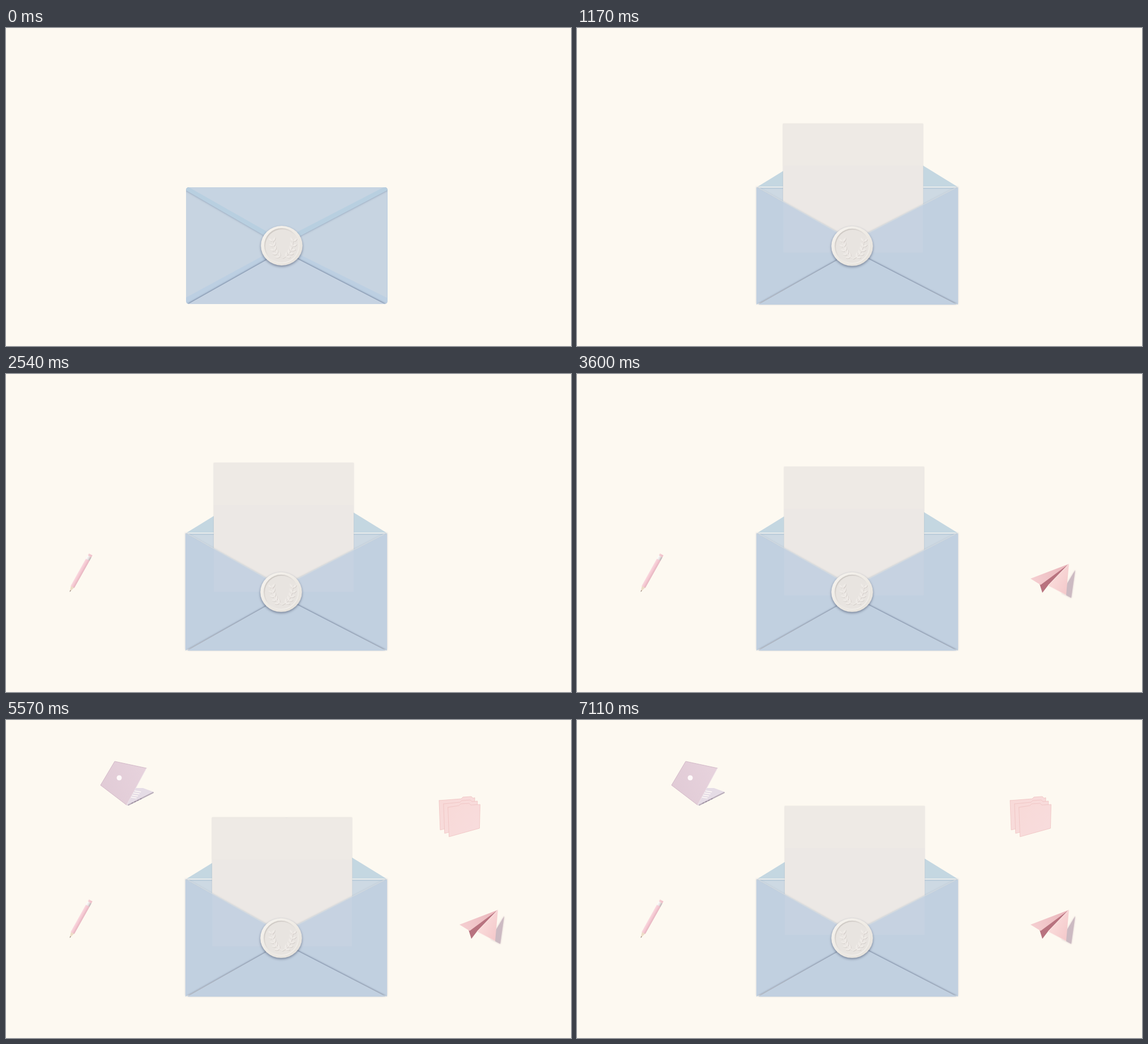
An HTML page with a canvas for the animation above (7.15 s loop, 998 by 561 pixels).

```html
<!DOCTYPE html>
<html lang="en">
<head>
<meta charset="utf-8">
<title>Letter</title>
<style>
html, body { margin: 0; width: 100%; height: 100%; overflow: hidden; background: #fdf9f1; }
canvas { display: block; }
</style>
</head>
<body>
<canvas id="stage" width="998" height="561"></canvas>
<script>
const W = 998, H = 561, LOOP = 7150, TAU = Math.PI * 2;
const ctx = document.getElementById('stage').getContext('2d');
const layerCanvas = document.createElement('canvas');
layerCanvas.width = W;
layerCanvas.height = H;
const layer = layerCanvas.getContext('2d');

const clamp = v => Math.max(0, Math.min(1, v));
const part = (t, start, length) => clamp((t - start) / length);
const smooth = k => k * k * (3 - 2 * k);
const easeOut = k => 1 - (1 - k) ** 3;
const mix = (a, b, k) => a + (b - a) * k;

function trace(g, pts) {
  g.beginPath();
  for (const [x, y] of pts) g.lineTo(x, y);
}
function poly(g, fill, ...pts) {
  trace(g, pts);
  g.closePath();
  g.fillStyle = fill;
  g.fill();
}
function line(g, color, width, ...pts) {
  trace(g, pts);
  g.strokeStyle = color;
  g.lineWidth = width;
  g.lineCap = 'round';
  g.stroke();
}
function disc(g, x, y, r, fill) {
  g.beginPath();
  g.arc(x, y, r, 0, TAU);
  g.fillStyle = fill;
  g.fill();
}
function blend(g, [x0, y0], [x1, y1], ...colors) {
  const f = g.createLinearGradient(x0, y0, x1, y1);
  colors.forEach((c, i) => f.addColorStop(i / (colors.length - 1), c));
  return f;
}
function withShadow(g, color, blur, dy, paint) {
  g.save();
  g.shadowColor = color;
  g.shadowBlur = blur;
  g.shadowOffsetY = dy;
  paint();
  g.restore();
}

// ---- wax seal, drawn around 0,0 ----
function leaf(g, x, y, angle, size) {
  g.save();
  g.translate(x, y);
  g.rotate(angle);
  g.beginPath();
  g.moveTo(0, 0);
  g.quadraticCurveTo(size / 2, -size * .4, size, 0);
  g.quadraticCurveTo(size / 2, size * .4, 0, 0);
  g.fill();
  g.restore();
}
function wreath(g, shift, color) {
  g.strokeStyle = g.fillStyle = color;
  for (const side of [-1, 1]) {
    g.save();
    g.translate(2 + shift, 20 + shift);
    g.scale(side, 1);
    g.beginPath();
    g.moveTo(0, 2);
    g.quadraticCurveTo(18, -6, 18, -32);
    g.stroke();
    for (let k = .15; k < 1; k += .19) {
      const q = 1 - k, x = 36 * k * q + 18 * k * k, y = 2 * q * q - 12 * k * q - 32 * k * k;
      for (const turn of [.7, -.8]) leaf(g, x, y, turn - .4 - k, 9);
    }
    g.restore();
  }
}
function seal(g, x, y) {
  g.save();
  g.translate(x, y);
  withShadow(g, 'rgba(80,90,115,.65)', 4, 2, () => {
    g.beginPath();
    g.ellipse(0, 0, 36.8, 35, 0, 0, TAU);
    g.fillStyle = blend(g, [-26, -30], [26, 30], '#f5f2ed', '#eeeae4', '#e6e2dc');
    g.fill();
  });
  disc(g, 0, 0, 31, blend(g, [-20, -24], [20, 24], '#cfcac5', '#e6e2de', '#f7f4f0'));
  disc(g, .5, .5, 29.3, '#e8e4e0');
  wreath(g, .8, '#d2ccc8');
  wreath(g, 0, '#efebe7');
  g.restore();
}

// ---- envelope ----
const LEFT = 317, RIGHT = 673, TOP = 281, BOTTOM = 488, MID = 487;
const sides = [LEFT, RIGHT];
const FRONT = '#c1d0e0', CREASE = 'rgba(85,100,130,.75)';

function bottomFlap(g, fill) {
  withShadow(g, CREASE, 3, -1, () =>
    poly(g, fill, [LEFT + 3, BOTTOM], [MID + 1, 393.5], [RIGHT - 2, BOTTOM]));
}

function closedEnvelope(g) {
  g.save();
  g.beginPath();
  g.roundRect(LEFT + 1, TOP, RIGHT - LEFT, BOTTOM - TOP - 1, 5);
  g.clip();
  g.fillStyle = '#bccfe2';
  g.fillRect(LEFT, TOP, RIGHT - LEFT + 2, BOTTOM - TOP);
  for (const x of sides) poly(g, '#c7d4e1', [x, TOP], [MID, 384], [x, BOTTOM - 12]);
  bottomFlap(g, '#c6d3e2');
  withShadow(g, 'rgba(110,130,160,.5)', 3, 1, () =>
    poly(g, '#b8cfe0', [LEFT, TOP - 5], [LEFT, TOP + 5], [MID, 384], [RIGHT + 1, TOP + 5], [RIGHT + 1, TOP - 5]));
  poly(g, '#c6d4e2', [LEFT + 6, TOP], [MID, 374], [RIGHT - 6, TOP]);
  g.restore();
  seal(g, MID, 384);
}

function backPanel(g) {
  poly(g, '#c4d7e1', [LEFT + 2, TOP - 1], [494, 172.5], [497, 172.5], [RIGHT - 1, TOP - 1]);
  poly(g, '#cdd9e3', [LEFT + 1, TOP], [RIGHT - 1, TOP], [MID, 390]);
  line(g, '#b9cbd9', 1.5, [LEFT + 4, TOP + 2], [RIGHT - 3, TOP + 2]);
}

function frontPanel(g) {
  withShadow(g, 'rgba(130,145,170,.5)', 3, -1, () => {
    for (const x of sides) poly(g, FRONT, [x, TOP], [MID, 376], [MID, 394], [x, BOTTOM]);
  });
  line(g, '#d0d9e1', 1.5, [LEFT + 4, TOP + 1], [MID, 376], [RIGHT - 4, TOP + 1]);
  bottomFlap(g, FRONT);
}

// ---- letter sheet ----
const SHEET_W = 247, SHEET_H = 227, FOLD = 74;
const sheetX = t => 365.3 + 1.8 * Math.cos(TAU * (t - 2700) / 4400);
function sheetY(t) {
  const rise = easeOut(part(t, 740, 1160));
  const sag = part(t, 1900, 4370) ** .65;
  const lift = smooth(part(t, 6270, 840));
  return mix(228, 150, rise) + 25 * sag - 23 * lift;
}

function openEnvelope(g, t) {
  const x = sheetX(t), y = sheetY(t), show = smooth(part(t, 740, 360));
  backPanel(g);
  g.globalAlpha = show;
  withShadow(g, 'rgba(140,140,150,.3)', 2, 0, () => {
    g.fillStyle = '#edeae5';
    g.fillRect(x, y, SHEET_W, SHEET_H);
  });
  g.fillStyle = '#ebe8e4';
  g.fillRect(x, y + FOLD, SHEET_W, SHEET_H - FOLD);
  g.globalAlpha = 1;
  frontPanel(g);
  // the sheet shows faintly through the front
  g.fillStyle = `rgba(236,232,228,${.09 * show})`;
  g.fillRect(x, y, SHEET_W, SHEET_H);
  seal(g, MID - 1, 384.8);
}

// ---- desk things ----
function pencil(g) {
  const band = (x, w, half, ...colors) => {
    g.fillStyle = blend(g, [0, -half], [0, half], ...colors);
    g.fillRect(x, -half, w, half * 2);
  };
  g.translate(112.5, 384.5);
  g.rotate(Math.atan2(-66, 37));
  poly(g, '#ecdcc6', [0, 0], [11, -3.4], [11, 3.4]);
  poly(g, '#8f7d7c', [0, 0], [3, -1], [3, 1]);
  band(10, 56, 3.7, '#f9d8de', '#f5c8d2', '#e5b4bf');
  band(65, 7, 3.7, '#ffffff', '#e9e2e2', '#b9adb0');
  band(72, 4, 3.5, '#f7d3d8', '#eebcc6');
}

function plane(g) {
  const nose = [869, 335], wing = [801, 361], keel = [822, 386], fold = [832, 373], tail = [864, 390];
  withShadow(g, 'rgba(190,165,175,.7)', 3, 0, () =>
    poly(g, '#ccbac2', [880, 346], [856, 386], [873, 395]));
  poly(g, '#b8737f', nose, [817, 370], keel, fold);
  poly(g, blend(g, wing, nose, '#f5cfd1', '#e9b4ba'), nose, wing, [819, 372]);
  poly(g, blend(g, fold, tail, '#fadbda', '#f3c8ca'), nose, fold, tail);
  line(g, '#fbe6e3', 1, nose, fold, tail);
}

function laptop(g) {
  const hinge = [213, 150], back = [248, 85], corner = [167, 115], end = [261, 127];
  poly(g, '#e5dce6', hinge, [229, 120], [242, 120], end, [216, 151]);
  line(g, '#b9adba', 2, [216, 150], [260, 128]);
  for (let i = 0; i < 4; i++) {
    const x = 220 + i * 2.6, y = 136 - i * 3.6;
    line(g, '#fffaf6', 1.5, [x, y], [x + 10, y + 1.5]);
    line(g, '#8f8295', 1.2, [222 + i * 5, 147 - i * 2.4], [224 + i * 5, 146 - i * 2.4]);
  }
  poly(g, blend(g, corner, back, '#e1cbd6', '#e7d3dd'), [192, 73], back, hinge, corner);
  line(g, '#d2b9c7', 1, back, [192, 73], corner, hinge);
  line(g, '#eee2e8', 1, back, hinge);
  disc(g, 200, 102, 4.5, '#fffafa');
}

function folders(g) {
  for (let i = 0; i < 3; i++) {
    const x = 765 + i * 7.8, y = 139 + i * 6, right = 828 + i * 4.7, tab = 804 - i * 2;
    const edge = [
      [x, y + 3], [tab, y], [tab + 3, y - 3], [tab + 18, y - 4], [tab + 21, y - 1],
      [right, y - 2], [right - 1, y + 40], [x + 2, y + 55], [x, y + 3]
    ];
    poly(g, blend(g, [x, y], [right, y + 50], '#f8dad8', '#f8dcdd'), ...edge);
    line(g, '#efc2c1', .8, ...edge);
  }
}

function drawLayer(alpha, paint) {
  if (alpha <= 0) return;
  layer.clearRect(0, 0, W, H);
  layer.save();
  paint(layer);
  layer.restore();
  ctx.globalAlpha = alpha;
  ctx.drawImage(layerCanvas, 0, 0);
  ctx.globalAlpha = 1;
}

function draw(t) {
  ctx.fillStyle = '#fdf9f1';
  ctx.fillRect(0, 0, W, H);
  const open = smooth(part(t, 30, 600));
  if (open < 1) closedEnvelope(ctx);
  drawLayer(open, g => openEnvelope(g, t));
  [pencil, plane, laptop, folders].forEach((item, i) =>
    drawLayer(smooth(part(t, 1800 + i * 1000, 480)), item));
}

const begin = performance.now();
function tick(now) {
  draw(Math.max(0, now - begin) % LOOP);
  requestAnimationFrame(tick);
}
draw(0);
requestAnimationFrame(tick);
</script>
</body>
</html>
```
